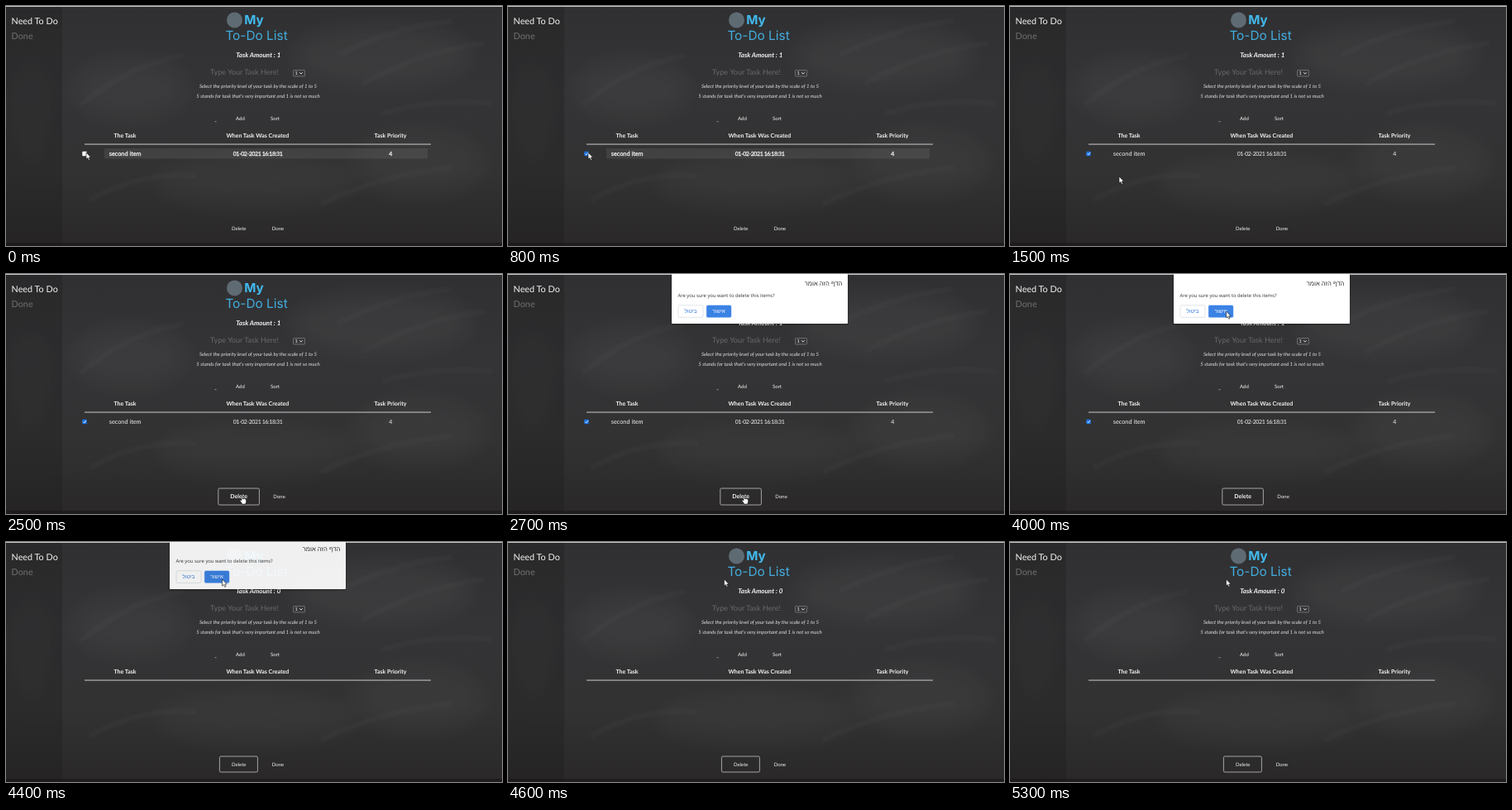
These frames come from a looping animation (600 by 290 pixels, 5.4 s). An HTML page:

```html
<!DOCTYPE html>
<html lang="en">
<head>
<meta charset="utf-8">
<title>To-Do List</title>
<style>
  html, body { margin: 0; width: 100%; height: 100%; overflow: hidden; background: #2f2f31; }
  svg { display: block; width: 600px; height: 290px; }
  text { font-family: Lato, sans-serif; fill: #f4f4f4; text-rendering: geometricPrecision; white-space: pre; }
  .mid { text-anchor: middle; }
  .btn { font-size: 6px; }
  .hint { font-size: 6.1px; font-style: italic; fill: #dedede; }
  .head { font-size: 7px; font-weight: 700; }
  .row { font-size: 7.3px; }
  .date { font-size: 7px; letter-spacing: -.4px; }
  .logo { font-family: Inter, sans-serif; }
  .ui { font-family: "Open Sans", sans-serif; fill: #303236; }
  .heb { font-family: "Liberation Sans", Arial, sans-serif; }
</style>
</head>
<body>
<svg viewBox="0 0 600 290">
  <defs>
    <linearGradient id="board" x1="0" y1="0" x2="0" y2="1">
      <stop offset="0" stop-color="#303032"/>
      <stop offset=".35" stop-color="#343436"/>
      <stop offset=".7" stop-color="#323233"/>
      <stop offset="1" stop-color="#2a2829"/>
    </linearGradient>
    <filter id="soft" x="-50%" y="-50%" width="200%" height="200%"><feGaussianBlur stdDeviation="13"/></filter>
    <filter id="chalk" x="-50%" y="-50%" width="200%" height="200%"><feGaussianBlur stdDeviation="2.5"/></filter>
    <filter id="shade" x="-10%" y="-20%" width="120%" height="150%"><feGaussianBlur stdDeviation="1.2"/></filter>
  </defs>

  <rect width="600" height="290" fill="url(#board)"/>
  <g filter="url(#soft)" fill="#fff">
    <ellipse cx="150" cy="100" rx="70" ry="38" opacity=".035"/>
    <ellipse cx="300" cy="215" rx="120" ry="30" opacity=".03"/>
    <ellipse cx="455" cy="60" rx="110" ry="36" opacity=".045"/>
    <ellipse cx="500" cy="190" rx="80" ry="40" opacity=".035"/>
    <ellipse cx="30" cy="130" rx="24" ry="70" opacity=".02"/>
  </g>
  <g filter="url(#chalk)" fill="none" stroke="#fff" stroke-width="5" opacity=".03">
    <path d="M400 60Q470 25 540 18M430 95Q500 55 580 45M90 120Q150 70 215 60M380 240Q450 205 540 195M100 235Q160 200 230 205M455 130Q520 110 590 118"/>
  </g>
  <rect width="68" height="290" fill="#1c1a1c" opacity=".28"/>
  <rect y="286" width="600" height="4" fill="#1e1a1a" opacity=".75"/>
  <rect width="600" height="1" fill="#c9c9c9"/>
  <rect x="252.5" y="139.3" width="2" height=".8" fill="#aaa"/>

  <text x="6.6" y="21.8" font-size="10.8">Need To Do</text>
  <text x="6.6" y="39.6" font-size="10.8" style="fill:#707072">Done</text>

  <circle cx="276.5" cy="17" r="9.5" fill="#5f6b73"/>
  <text class="logo" x="288.3" y="21.8" font-size="15.2" font-weight="700" style="fill:#42b9ec">My</text>
  <text class="logo" x="265.4" y="41" font-size="15.4" style="fill:#43aee0">To-Do List</text>

  <text class="mid" id="amount" x="305.3" y="62" font-size="8" font-weight="700" font-style="italic"></text>
  <text x="247" y="83" font-size="9.1" style="fill:#69696b">Type Your Task Here!</text>
  <rect x="347.5" y="77.5" width="14" height="7.5" rx=".8" fill="#38383a" stroke="#858585" stroke-width=".7"/>
  <text x="349.4" y="83.4" font-size="5.6">1</text>
  <path d="M355.2 80.3l1.8 1.8 1.8-1.8" fill="none" stroke="#eee" stroke-width=".9"/>
  <text class="mid hint" x="305" y="99.2">Select the priority level of your task by the scale of 1 to 5</text>
  <text class="mid hint" x="305" y="111">5 stands for task that's very important and 1 is not so much</text>
  <text class="mid btn" x="283.4" y="138">Add</text>
  <text class="mid btn" x="325.5" y="138">Sort</text>

  <text class="mid head" x="144" y="158.6">The Task</text>
  <text class="mid head" x="304.3" y="158.6">When Task Was Created</text>
  <text class="mid head" x="465" y="158.6">Task Priority</text>
  <rect x="95" y="166.6" width="419" height=".9" fill="#dcdcdc"/>

  <g id="item">
    <rect id="band" x="119" y="172" width="391" height="12.5" fill="#fff" opacity=".075"/>
    <rect id="box" x="92.3" y="175.8" width="5.4" height="5.4" rx=".7"/>
    <path id="tick" d="M93.4 178.6l1.3 1.3 2.2-2.8" fill="none" stroke="#fff" stroke-width=".9"/>
    <g id="cells" stroke="#f4f4f4">
      <text class="mid row" x="144.2" y="180.5">second item</text>
      <text class="mid date" x="304.5" y="180.5">01-02-2021 16:18:31</text>
      <text class="mid date" x="465" y="180.5">4</text>
    </g>
  </g>

  <rect id="frame" rx="1.5" fill="none" stroke="#c4c4c4" stroke-width=".8"/>
  <text class="mid" id="del" x="281.7" y="270.6">Delete</text>
  <text class="mid btn" id="done" y="270.6">Done</text>

  <g id="dialog">
    <rect x="198" y="-20" width="213" height="81" rx="1.5" fill="#000" opacity=".4" filter="url(#shade)"/>
    <rect x="198" y="-20" width="213" height="80" rx="1" fill="#fff"/>
    <text class="mid ui heb" x="381.6" y="14.2" font-size="7.6">הדף הזה אומר</text>
    <text class="ui" x="205.6" y="27.7" font-size="5.85">Are you sure you want to delete this items?</text>
    <rect x="206" y="37.8" width="30" height="14.6" rx="1.6" fill="#fff" stroke="#d6d9de" stroke-width=".7"/>
    <text class="mid heb" x="221" y="47.2" font-size="6.5" style="fill:#2f78dc">ביטול</text>
    <rect x="239.6" y="37.2" width="31" height="15.8" rx="2.2" fill="#b4d0f7"/>
    <rect x="240.3" y="37.9" width="29.6" height="14.4" rx="1.6" fill="#3a82e4"/>
    <text class="mid heb" x="255.1" y="47.2" font-size="6.5" style="fill:#fff">אישור</text>
  </g>

  <g id="cursor" fill="#fff" stroke="#111" stroke-width=".6" stroke-linejoin="round">
    <path id="arrow" d="M0 0V8l1.8-1.6 1.3 2.9 1.4-.6-1.3-2.8h2.5z"/>
    <path id="hand" d="M-1-1.5c0-1.2 1.5-1.2 1.5 0V2c.2-.8 1.3-.7 1.4 0 .3-.6 1.3-.5 1.4.2.4-.5 1.3-.3 1.3.5v2.4c0 1.3-.8 1.7-.9 3H-.3C-.6 6.7-2.3 5.2-2.8 4c-.5-1 .7-1.5 1.8-.2z"/>
  </g>
</svg>
<script>
  const LOOP = 5400, STEP = 100;
  const $ = id => document.getElementById(id);
  const set = (id, attrs) => {
    for (const k in attrs) $(id).setAttribute(k, attrs[k]);
  };
  const show = (id, on) => set(id, { visibility: on ? "inherit" : "hidden" });

  // time, x, y of the pointer tip
  const path = [
    [0, 97, 177], [1000, 97, 177], [1200, 104, 182], [1500, 132, 206],
    [1800, 186, 236], [2200, 281, 267], [2400, 286, 270], [3100, 286, 270],
    [3400, 281, 177], [3600, 275, 100], [3800, 265, 56], [4000, 261.5, 45]
  ];

  function pointer(t) {
    const i = path.findIndex(p => p[0] > t);
    if (i < 0) return path[path.length - 1].slice(1);
    const [a, b] = [path[i - 1], path[i]];
    const k = (t - a[0]) / (b[0] - a[0]);
    return [a[1] + (b[1] - a[1]) * k, a[2] + (b[2] - a[2]) * k];
  }

  // opacity and vertical offset of the confirm box
  function dialogState(t) {
    if (t < 2600 || t >= 4600) return [0, 0];
    if (t < 2700) return [.6, -6];
    if (t < 4400) return [1, 0];
    return t < 4500 ? [.93, -3] : [.35, -10];
  }

  function draw(t) {
    const [x, y] = pointer(t);
    const checked = t >= 600, rowHover = t < 1300, removed = t >= 4400;
    const hover = t >= 2200 && !removed;
    const hand = t >= 2200 && t < 3800;

    $("amount").textContent = "Task Amount : " + (removed ? 0 : 1);
    show("item", !removed);
    show("band", rowHover);
    set("cells", { "stroke-width": rowHover ? .28 : 0 });
    set("box", { fill: checked ? "#1a73e8" : "#fff" });
    show("tick", checked && !removed);

    show("frame", t >= 2200);
    set("frame", hover
      ? { x: 256.8, y: 259, width: 49.6, height: 20 }
      : { x: 258.4, y: 259, width: 46, height: 19 });
    set("del", { "font-size": hover ? 7 : 6, "font-weight": hover ? 700 : 400 });
    set("done", { x: hover ? 330.6 : 329 });

    const [alpha, dy] = dialogState(t);
    set("dialog", { opacity: alpha, transform: `translate(0 ${dy})` });

    set("cursor", { transform: `translate(${x} ${y})` });
    show("arrow", !hand);
    show("hand", hand);
  }

  function tick() {
    const t = performance.now() % LOOP;
    draw(Math.floor(t / STEP) * STEP);
    requestAnimationFrame(tick);
  }
  tick();
</script>
</body>
</html>
```
